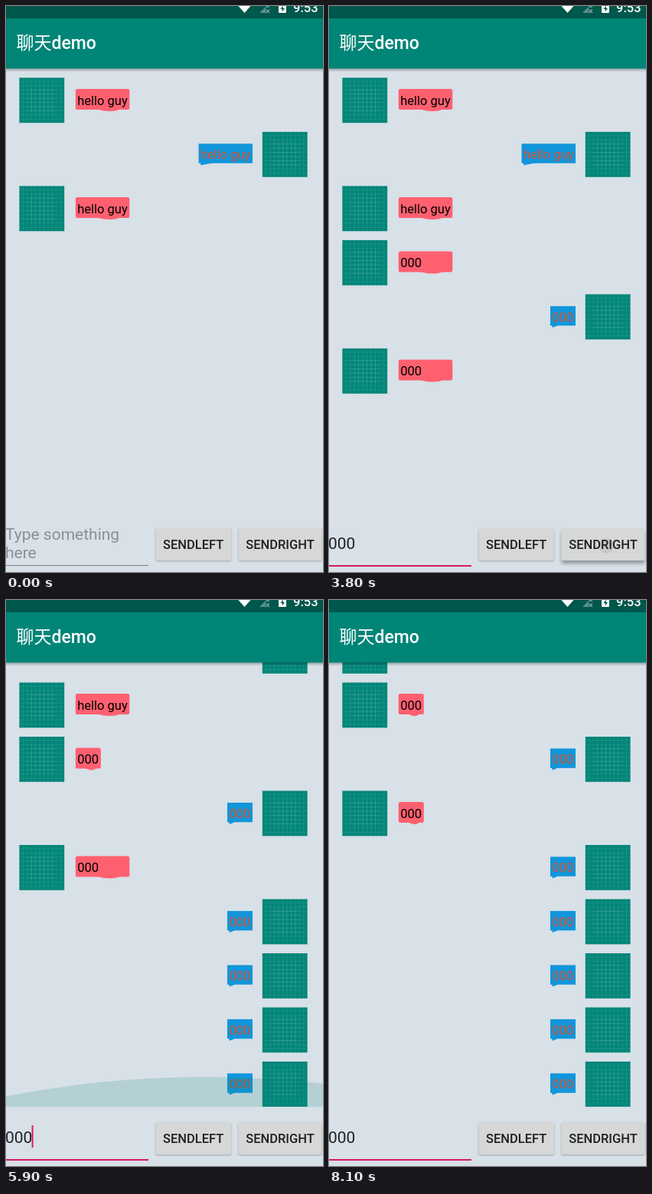
Animation of 414 by 737 pixels, one loop 8.2 s. Source, as an HTML page:

```html
<!DOCTYPE html>
<html lang="en">
<head>
<meta charset="utf-8">
<title>Chat demo</title>
<style>
  html, body { margin: 0; width: 100%; height: 100%; overflow: hidden; background: #d8e0e8; }
  svg { display: block; width: 414px; height: 737px; font-family: Roboto, "Noto Sans CJK SC", "Noto Sans CJK", sans-serif; }
  .bubble { font-size: 16.5px; }
  .field { font-size: 21px; }
  .label { font-size: 16.5px; font-weight: 500; fill: #1e1f1f; text-anchor: middle; }
  .button { fill: #d6d7d7; filter: drop-shadow(0 1px 1px rgba(0,0,0,.28)); }
  .button.pressed { filter: drop-shadow(0 4px 2px rgba(0,0,0,.32)); }
</style>
</head>
<body>
<svg viewBox="0 0 414 737">
  <defs>
    <clipPath id="listClip"><rect y="81" width="414" height="579"/></clipPath>
    <linearGradient id="barShadow" x2="0" y2="1">
      <stop stop-color="#000" stop-opacity=".3"/>
      <stop offset="1" stop-color="#000" stop-opacity="0"/>
    </linearGradient>
    <g id="avatar">
      <rect width="58.8" height="58.8" fill="#008577"/>
      <path id="grid" stroke="#fff" stroke-opacity=".2" stroke-width=".45" fill="none"/>
    </g>
  </defs>
  <rect width="414" height="737" fill="#d8e0e8"/>
  <g clip-path="url(#listClip)">
    <g id="rows"></g>
    <circle id="glow" cx="260" r="1352" fill="#008577" fill-opacity=".17"/>
  </g>

  <rect y="81" width="414" height="5" fill="url(#barShadow)"/>
  <rect width="414" height="81.5" fill="#008577"/>
  <rect width="414" height="16" fill="#00574b"/>
  <text x="13.5" y="55.5" font-size="23" font-weight="500" fill="#fff">聊天demo</text>
  <g fill="#fff">
    <path d="M303.5 0H319.5L311.5 9Z"/>
    <path d="M331 9 340 0H344V2H339V9Z" opacity=".35"/>
    <path d="M339.5 4.5l4.5 4.5m0-4.5l-4.5 4.5" stroke="#fff" stroke-width="1.2" opacity=".5"/>
    <path d="M356 0H366V8Q366 9 365 9H357Q356 9 356 8Z"/>
    <path d="M361.5 0 358.5 4H360.7V7.5L364 3H361.8V0Z" fill="#00574b"/>
    <text x="375" y="7.5" font-size="16.5" font-weight="500">9:53</text>
  </g>

  <g id="field" class="field"></g>
  <rect id="left" class="button" x="195.5" y="680" width="98.5" height="42" rx="2"/>
  <rect id="right" class="button" x="303.5" y="680" width="109" height="42" rx="2"/>
  <circle id="ripple" fill="#000" fill-opacity=".07"/>
  <text class="label" x="244.7" y="707">SENDLEFT</text>
  <text class="label" x="358" y="707">SENDRIGHT</text>
</svg>
<script>
const LOOP = 8200, FIRST_Y = 93.4, PITCH = 70.5, LAST_Y = 601;
const SIDES = 'LRLLRLRRRRR';
const $ = id => document.getElementById(id);

// Each step changes part of the state and keeps the rest.
const STEPS = [
  [0, { rows: 3, wide: [], text: '', focus: 0, cursor: 0, press: '', ripple: [0, 0, 0], glow: 0, shift: 0 }],
  [700, { focus: .5, cursor: 1 }],
  [800, { focus: 1 }],
  [900, { text: '0' }],
  [1000, { text: '00' }],
  [1200, { text: '000' }],
  [1500, { press: 'left' }],
  [1600, { rows: 4, wide: [3] }],
  [1700, { press: '', cursor: 0 }],
  [2100, { cursor: 1 }],
  [2300, { press: 'right' }],
  [2400, { press: '', rows: 5 }],
  [2600, { cursor: 0 }],
  [3000, { cursor: 1 }],
  [3400, { press: 'left' }],
  [3500, { rows: 6, wide: [3, 5], cursor: 0 }],
  [3600, { press: '' }],
  [3800, { press: 'right', ripple: [362, 703, 10] }],
  [3900, { press: '', rows: 7, wide: [3, 4, 5], ripple: [0, 0, 0] }],
  [4000, { press: 'right', cursor: 1 }],
  [4100, { rows: 8 }],
  [4200, { press: '' }],
  [4400, { cursor: 0 }],
  [4900, { cursor: 1 }],
  [5300, { press: 'right', rows: 9, wide: [5, 6], ripple: [328, 684, 3] }],
  [5400, { press: '', cursor: 0, ripple: [0, 0, 0] }],
  [5500, { press: 'right' }],
  [5600, { press: '', rows: 10, wide: [5] }],
  [5700, { glow: 14 }],
  [5800, { glow: 28, cursor: 1 }],
  [5900, { glow: 39 }],
  [6000, { glow: 18 }],
  [6100, { glow: 0 }],
  [6300, { shift: 24, cursor: 0 }],
  [6400, { shift: 10 }],
  [6500, { shift: 0 }],
  [6700, { cursor: 1 }],
  [7200, { press: 'right', cursor: 0 }],
  [7300, { press: '', rows: 11, wide: [] }],
  [7600, { cursor: 1 }],
  [8100, { cursor: 0 }]
];
let merged = {};
const states = STEPS.map(([at, change]) => ({ at, ...(merged = { ...merged, ...change }) }));

function gridPath() {
  const unit = 58.8 / 108;
  const cross = (p, from, to) => {
    const [a, b, c] = [p, from, to].map(v => (v * unit).toFixed(2));
    return `M${a} ${b}V${c}M${b} ${a}H${c}`;
  };
  let d = '';
  for (let p = 9; p < 108; p += 10) d += cross(p, 0, 108);
  for (let p = 29; p < 80; p += 10) d += cross(p, 19, 89);
  return d;
}

function row(i, y, wide) {
  const isLeft = SIDES[i] === 'L';
  const text = i < 3 ? 'hello guy' : '000';
  const width = i < 3 || wide ? 70.5 : 33;
  const x = isLeft ? 90.8 : 322 - width;
  const shape = isLeft
    ? `<rect x="${x}" y="${y + 14.6}" width="${width}" height="27" rx="2.5" fill="#ff6070"/>
       <path d="M${x + width * .4} ${y + 41}q${width * .25} 5 ${width * .43} 0z" fill="#ff6070"/>`
    : `<rect x="${x}" y="${y + 15.4}" width="${width}" height="25.4" fill="#1296db"/>
       <path d="M${x + 2} ${y + 40}l1 3.4 ${width * .25} -3.4z" fill="#1296db"/>`;
  return `<use href="#avatar" x="${isLeft ? 17.4 : 334.8}" y="${y}"/>${shape}
    <text class="bubble" x="${x + 2.4}" y="${y + 35.2}" fill="${isLeft ? '#000' : '#d2512f'}">${text}</text>`;
}

function field({ text, focus, cursor }) {
  const words = text
    ? `<text x="-1" y="707" fill="#1f2123">${text}</text>`
    : `<g fill="#8a9096"><text x="-1" y="694.5">Type something</text><text x="-1" y="719.3">here</text></g>`;
  const line = `<rect y="728" width="186" height="1" fill="#7c8286"/>
    <rect y="728" width="186" height="2" fill="#d81b60" opacity="${focus}"/>`;
  const caret = `<rect x="${text.length * 11.8 - 1.8}" y="684" width="2" height="29" fill="#d81b60" opacity="${cursor}"/>`;
  return words + line + caret;
}

function draw(state) {
  const bottom = FIRST_Y + PITCH * (state.rows - 1);
  const offset = FIRST_Y - Math.max(0, bottom - LAST_Y) + state.shift;
  $('rows').innerHTML = Array.from({ length: state.rows }, (_, i) =>
    row(i, offset + i * PITCH, state.wide.includes(i))).join('');
  $('field').innerHTML = field(state);
  $('glow').setAttribute('cy', 660 - state.glow + 1352);
  for (const id of ['left', 'right']) $(id).classList.toggle('pressed', state.press === id);
  ['cx', 'cy', 'r'].forEach((name, i) => $('ripple').setAttribute(name, state.ripple[i]));
}

let shown;
const start = performance.now();
function tick() {
  const time = (performance.now() - start) % LOOP;
  const state = states.findLast(s => s.at <= time);
  if (state !== shown) draw(shown = state);
  requestAnimationFrame(tick);
}
$('grid').setAttribute('d', gridPath());
tick();
</script>
</body>
</html>
```
